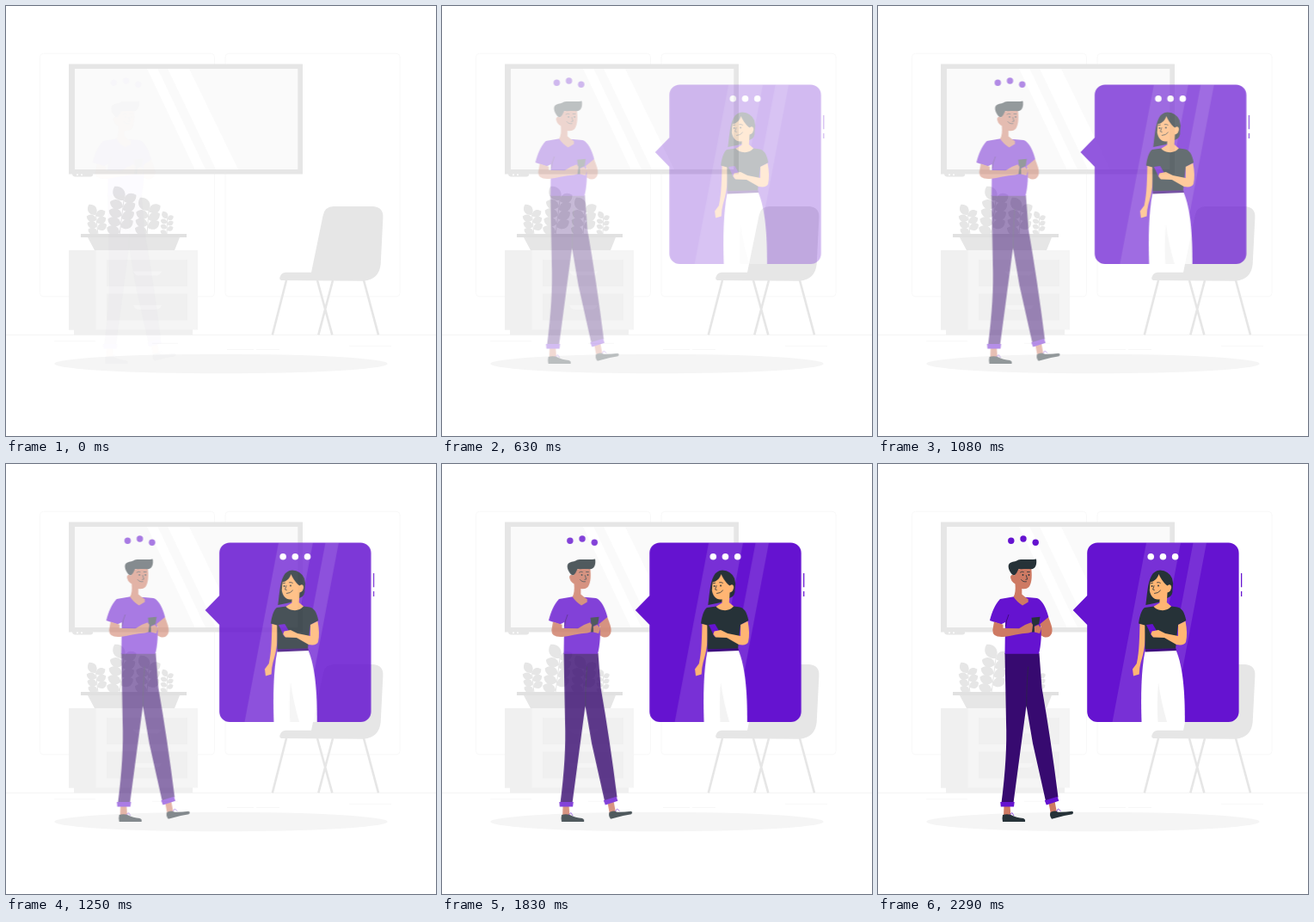
An HTML page that plays this animation: 500 px wide and 500 px high, repeating every 2.33 s.

```html
<!DOCTYPE html>
<html lang="en">
<head>
<meta charset="utf-8">
<title>Video chat</title>
<style>
  html, body { margin: 0; width: 100%; height: 100%; overflow: hidden; background: #fff; }
  svg { display: block; width: 100%; height: 100%; }
  #man, #call { animation: 2330ms linear var(--at, 0ms) both paused; }
  #man { animation-name: from-left; }
  #call { animation-name: from-right; animation-timing-function: cubic-bezier(.36, -.01, .5, 1.38); }
  @keyframes from-left { from { opacity: 0; transform: translateX(-30px); } to { opacity: 1; transform: none; } }
  @keyframes from-right { from { opacity: 0; transform: translateX(30px); } to { opacity: 1; transform: translateX(0); } }
  .grey { fill: #e6e6e6; }
  .pale { fill: #f0f0f0; }
  .light { fill: #f5f5f5; }
  .purple { fill: #6513d0; }
  .dark { fill: #263238; }
  .tan { fill: #ce7a63; }
  .peach { fill: #ffb573; }
  .line { fill: none; stroke: #263238; stroke-width: .8; stroke-linecap: round; }
</style>
</head>
<body>
<svg viewBox="0 0 500 500">
  <g fill="none" stroke="#f7f7f7" stroke-width=".8">
    <rect x="39.5" y="55.3" width="203" height="282.5" rx="4"/>
    <rect x="255" y="55.3" width="203" height="282.5" rx="4"/>
  </g>
  <path d="M0 382.4H500" stroke="#ebebeb" stroke-width=".6"/>
  <path d="M56 389.8H104M170 392.3H200M399 395.3H448M257 399.5H288M291 399.5H318" stroke="#f2f2f2" stroke-width=".6"/>

  <!-- television -->
  <path class="grey" d="M73 67.5H345V195.5H73ZM77 195H101V197Q100 198.5 98 198.5H80Q77 198 77 195Z"/>
  <path fill="#fafafa" d="M80 73H339.3V190H80Z"/>
  <path fill="#fff" d="M164 73H176.5L232 190H219.5ZM188 73H213L270 190H244Z"/>
  <circle cx="83" cy="196.3" r="1" fill="#fff"/><circle cx="88" cy="196.3" r="1" fill="#fff"/>

  <!-- cabinet and planter -->
  <path class="pale" d="M79 376H217V382.4H79Z"/>
  <path class="light" d="M73 284H223V376.5H73Z"/>
  <path class="pale" d="M73 284H104.5V376.5H73ZM117 295H211V326H117ZM117 334.5H211V365.5H117Z"/>
  <path class="light" d="M148 308.5H181Q179 313.5 174 313.5H155Q150 313.5 148 308.5ZM148 348H181Q179 353 174 353H155Q150 353 148 348Z"/>
  <g id="plants" class="grey" stroke="#e6e6e6"></g>
  <path class="grey" d="M87 265H210V269H202L196 284H103L95 269H87Z"/>
  <path d="M87 265H210V269H87Z" fill="#e1e1e1"/>

  <!-- chair -->
  <path d="M326 319L309.8 382.4M362 319L379.3 382.4M380 319L363.3 382.4M416 319L433 382.4" fill="none" stroke="#e6e6e6" stroke-width="2.6"/>
  <path class="grey" d="M355 309.8L368.5 244Q370.5 233 381 233H427Q439 234 438.4 246L435.7 300Q434 318 416 319.7L320 319Q317 318 319 314Q321 309.8 326 309.8Z"/>

  <ellipse class="light" cx="250" cy="416" rx="193.8" ry="11.3"/>

  <g id="call">
    <path class="purple" d="M255.2 91.5H407.6A12 12 0 0 1 419.6 103.5V288A12 12 0 0 1 407.6 300H255.2A12 12 0 0 1 243.2 288V187L226.7 170L243.2 153V103.5A12 12 0 0 1 255.2 91.5Z"/>
    <path fill="#fff" fill-opacity=".12" d="M312 91.5H352L312.5 300H272.5ZM366.5 91.5H382L342.5 300H327Z"/>
    <path d="M422.6 127V143.3M422.6 148V154" stroke="#6513d0" stroke-width="1.3"/>
    <g fill="#fff">
      <circle cx="317.2" cy="107.8" r="3.8"/><circle cx="331.4" cy="107.8" r="3.8"/><circle cx="345.6" cy="107.8" r="3.8"/>
    </g>
    <!-- woman -->
    <path class="dark" d="M318 130C313.500 138 313 152 311.300 164L326 161L338 155Q343 153 342.500 145Q344 139 342 133Q338 124 328 123.500Q321 124 318 130Z"/>
    <path class="peach" d="M304.5 184L310.8 186C311.500 205 310 217 305.500 231L304.300 237L303.700 244.500L297 246.500L296 238.500L300.800 232C304 218 304 200 304.500 184Z"/>
    <path fill="#fff" d="M310.500 217.500L346.500 216.500C354.500 235 357 265 356.800 300H306.500C305.500 270 306 240 310.500 217.500Z"/>
    <path fill="#f3f3f3" d="M326 254Q324 280 325.500 300H336Q329 276 326 254Z"/>
    <path class="dark" d="M321 165.500L310 167C306 170 304 178 303 185.500L310.300 187.500L310.500 215.500H346C347 205 348 195 349 187L358.300 182C356.500 172 353 167 347 166.300L341 165.500Z"/>
    <path fill="#3d0c7d" d="M311 215.300L346.300 214.300L347 217L310.500 218.500Z"/>
    <path class="peach" d="M316.500 137.500C322 136.500 325.500 132 326.500 128C329 134 333 139 336.500 141.500Q340.500 138.500 341.200 143Q340.800 148.500 336.500 149.500L335.800 161L341 165.500Q336 171 329 170Q323 169 320.500 165.700L327.500 161.500V157.300C321 158.500 317 154 315.800 147Z"/>
    <path class="line" d="M316.800 138.800L319.500 138.300M324.500 137.700Q326.500 137 328.300 138.300M321 141.500L319.600 146L321.300 146.500M321.500 150.500Q326 150.500 328.500 147"/>
    <circle class="dark" cx="318.600" cy="142" r=".9"/><circle class="dark" cx="326" cy="141.500" r=".9"/>
    <path class="purple" d="M312 187L319.300 186L324 194L325.500 201L318.500 200.500Z"/>
    <path class="peach" d="M349 187L357.500 182.700C359.300 192 359.700 200 358 207Q356 211.500 347 210L333 202L320 201.500L317.300 198L318.500 194.500L326 193L334 197L349 200Z"/>
  </g>

  <g id="man">
    <g class="purple">
      <circle cx="154.800" cy="89.300" r="3.700"/><circle cx="169" cy="87" r="3.700"/><circle cx="183.200" cy="91.300" r="3.700"/>
    </g>
    <path class="tan" d="M146.500 397H153.500L154.500 410H146ZM198.500 394L205.500 392L208 405.500L201 407.500Z"/>
    <path class="dark" d="M145 408Q150 406.500 154.500 408Q161 411.500 169 412Q171.700 413 171 416H145Q144 412 145 408ZM200.500 405Q205 402 209.500 404.800Q217 405 226 403.800Q228 405 226 407.300Q214 409 202 412.700Q199 409 200.500 405Z"/>
    <path d="M153 408L156 405.500L158 409M207.500 404L209.500 401L212.500 403.500" fill="none" stroke="#6513d0" stroke-width=".7"/>
    <path fill="#370a70" d="M147.500 220H187.500L190.500 260Q201 320 209.500 387.500L195 392L180 325L172.500 281L157.500 394H143.500Q150.500 340 149 300Z"/>
    <path class="line" d="M174.500 236Q172.500 262 172.800 282" stroke-opacity=".7"/>
    <path class="purple" d="M142.300 393H158.700L158 398.600H142.800ZM193.800 391.300L208.700 386.800L210.300 391.800L195.800 396.500Z"/>
    <path class="tan" d="M187 183L198 177.500C200.500 185 204 191 202 197Q199 203 192.500 201L182 195V188.500H187L190 190.500Z"/>
    <path class="purple" d="M158 154.300L142 157C136 163 132 173 130 182L143 186.500L148 184L147.500 220.800H187C189.500 212 191 195 188.500 186L198.300 178C196 168 191 158 185 156L174 155Z"/>
    <path d="M152 175Q149 182 148.300 189" fill="none" stroke="#370a70" stroke-width=".8"/>
    <path class="dark" d="M178.500 178.700L188.500 177.800L187.200 186L182.500 188L181.800 195.500H178.800L179.500 187Z"/>
    <path class="tan" d="M135 183.500L145.500 186.700L145.500 191L164 191.300L171 187L178 184.300L180 187L179 195.300L175 196.500C165 197 155 200 146 201Q133 202 133.300 193ZM181.800 189L186.500 187L190 191L188 197L182 195.500Z"/>
    <path class="tan" d="M159 123L178 120C179.300 128 179.300 138 175.500 143Q172.500 146 167.300 145V151.500Q171 155 174.700 157V160.500L168 164.500Q161 160 157.500 154.300Q160.500 150 159.500 139.500Q154 136 154 131Q155.500 127 159 130Z"/>
    <path class="dark" d="M156 128.500C152.500 125 150 118 153 115.500C156 113 160 114 163 111.500C169 110 177 112 184 110.500C185 117 183 122.300 178 122.300C172 121.500 168 122.500 163.500 122L161 127L158.500 129.500Z"/>
    <path class="line" d="M165.500 126Q167.300 124.500 169.300 125.500M173.500 125.500L176.300 125.500M172.300 129.500L173.700 134L171.800 134.300M166.500 134.500Q168.500 137.500 172.500 136.800"/>
    <circle class="dark" cx="168.500" cy="129" r=".9"/><circle class="dark" cx="175.500" cy="129" r=".9"/>
  </g>
</svg>
<script>
  const LOOP = 2330, STEPS = 56, HOLD = 3;

  const leaf = (x, y, size, turn, flip = 1) =>
    `<path stroke="none" transform="translate(${x} ${y}) scale(${size * flip} ${size}) rotate(${turn})" d="M0 0C.2-.5.7-.55 1-.15C.85.35.35.45 0 0Z"/>`;

  // A stem with a tip leaf and alternating side leaves.
  function plant(x, y, footX, footY, size, pairs) {
    let out = `<path fill="none" d="M${x} ${y}L${footX} ${footY}"/>` + leaf(x, y, size * 1.2, -48, -1);
    for (let i = 0; i < pairs; i++) {
      const at = i / pairs, next = (i + .75) / pairs;
      const px = f => x + (footX - x) * f, py = f => y + (footY - y) * f;
      out += leaf(px(at), py(at) + 1, size, -18, 1) + leaf(px(next), py(next), size, -12, -1);
    }
    return out;
  }

  document.getElementById('plants').innerHTML =
    plant(104.5, 243, 107, 266, 12, 3) + plant(137, 226, 132, 266, 16, 4) +
    plant(166, 238, 164, 266, 15, 3) + plant(187.5, 247, 187, 266, 8, 3);

  const start = performance.now();
  function draw() {
    const t = (performance.now() - start) % LOOP;
    let step = Math.floor((Math.floor(t / 10) * 10 + 4.9) * 24 / 1000);
    if (step < HOLD) step = 0;
    document.documentElement.style.setProperty('--at', -(step + 1) / STEPS * LOOP + 'ms');
    requestAnimationFrame(draw);
  }
  draw();
</script>
</body>
</html>
```
